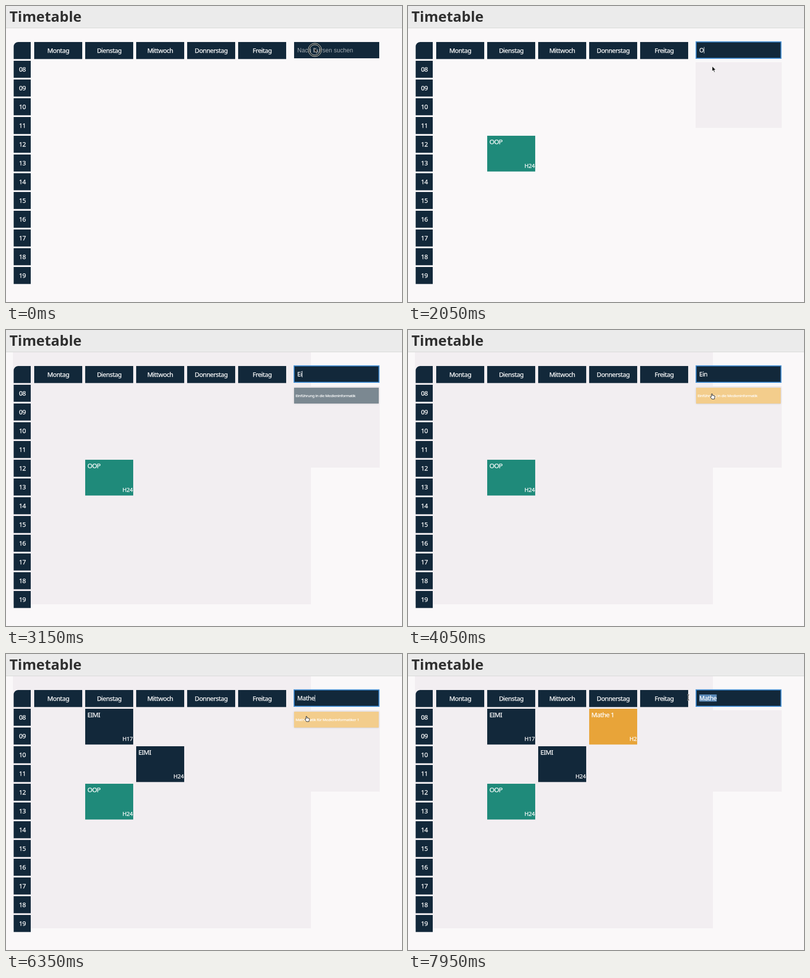
Recreate the animation shown at these times as an HTML page with a canvas. Size 800 by 600 pixels, loop 8 s.

```html
<!DOCTYPE html>
<html lang="de">
<head>
<meta charset="utf-8">
<title>Timetable</title>
<style>
  html, body { margin: 0; width: 100%; height: 100%; overflow: hidden; background: #faf8f9; }
  canvas { display: block; }
</style>
</head>
<body>
<canvas id="stage" width="800" height="600"></canvas>
<script>
const ctx = document.getElementById('stage').getContext('2d');
const LOOP = 8000;
const SANS = '"Noto Sans", sans-serif';
const NAVY = '#12283a', GREEN = '#1f8a7a', ORANGE = '#e8a439', TINT = '#f2eef1';
const DAYS = ['Montag', 'Dienstag', 'Mittwoch', 'Donnerstag', 'Freitag'];
const COURSES = [
  'Objektorientierte Programmierung mit Java',
  'Einführung in die Medieninformatik',
  'Mathematik für Medieninformatiker 1',
  'Multimedia Technology'
];
const CARDS = [
  { from: 1800, day: 1, hour: 12, name: 'OOP', room: 'H24', color: GREEN },
  { from: 4250, day: 1, hour: 8, name: 'EIMI', room: 'H17', color: NAVY },
  { from: 4250, day: 2, hour: 10, name: 'EIMI', room: 'H24', color: NAVY },
  { from: 6650, day: 3, hour: 8, name: 'Mathe 1', room: 'H2', color: ORANGE }
];
const TYPING = [
  [1050, 'O'], [2950, 'E'], [3150, 'Ei'], [3350, 'Ein'],
  [5150, 'M'], [5400, 'Ma'], [5550, 'Mat'], [5700, 'Math'], [5900, 'Mathe']
];
const LIST_OPEN = [[1050, 1800], [2950, 4250], [5150, 6650]];
const SELECTING = [[2600, 2950], [4750, 5150], [7250, LOOP]];
const CURSOR_HIDDEN = [[950, 1350], [2900, 3600], [5100, 6000]];
const CLICKS = [0, 1750, 2500, 4200, 4700, 6600, 7200];
// time, x, y of the pointer's resting points
const PATH = [
  [0, 624, 89], [1350, 624, 89], [1650, 622, 133], [1850, 622, 133],
  [2450, 592, 90], [2600, 592, 90], [2800, 576, 90], [3600, 576, 90],
  [4000, 615, 134], [4250, 615, 134], [4650, 612, 90], [4750, 612, 90],
  [4950, 576, 90], [6000, 576, 90], [6300, 608, 131], [6700, 608, 131],
  [7100, 630, 89], [7250, 630, 89], [7650, 592, 88], [7900, 566, 88], [LOOP, 566, 88]
];

const within = (t, spans) => spans.some(([a, b]) => t >= a && t < b);
const dayX = day => 57 + day * 103;
const hourY = hour => 111 + (hour - 8) * 38;

function rect(x, y, w, h, color) {
  ctx.fillStyle = color;
  ctx.fillRect(x, y, w, h);
}

function text(str, x, y, { size = 13, align = 'left', color = '#fff', spacing = -.6,
                           weight = 400, family = SANS, stroke = .25 } = {}) {
  ctx.font = `${weight} ${size}px ${family}`;
  ctx.letterSpacing = spacing + 'px';
  ctx.textAlign = align;
  ctx.fillStyle = ctx.strokeStyle = color;
  ctx.lineWidth = stroke;
  ctx.fillText(str, x, y);
  if (stroke) ctx.strokeText(str, x, y);
  return ctx.measureText(str).width;
}

function pointerAt(t) {
  const i = Math.max(1, PATH.findIndex(p => p[0] > t));
  const [t0, x0, y0] = PATH[i - 1], [t1, x1, y1] = PATH[i];
  const u = (t - t0) / (t1 - t0), e = u * u * (3 - 2 * u);
  return { x: x0 + (x1 - x0) * e, y: y0 + (y1 - y0) * e };
}

function drawTable() {
  rect(0, 0, 800, 44, '#ebebeb');
  rect(0, 44, 800, 1, '#d6d6d6');
  text('Timetable', 7, 32, { size: 29, weight: 700, color: '#303030', spacing: 0, stroke: 0 });
  ctx.fillStyle = NAVY;
  ctx.beginPath();
  ctx.roundRect(15.5, 73, 34.5, 34.5, [9, 0, 0, 0]);
  ctx.fill();
  DAYS.forEach((day, i) => {
    rect(dayX(i), 73, 97, 34.5, NAVY);
    text(day, dayX(i) + 48.5, 95, { align: 'center' });
  });
  for (let hour = 8; hour < 20; hour++) {
    rect(15.5, hourY(hour), 34.5, 34.5, NAVY);
    text(String(hour).padStart(2, '0'), 33, hourY(hour) + 22, { align: 'center' });
  }
}

function drawCard({ day, hour, name, room, color }) {
  const x = dayX(day), y = hourY(hour);
  rect(x, y, 97, 72.5, color);
  text(name, x + 4.5, y + 17);
  text(room, x + 96, y + 65, { size: 11.5, align: 'right', spacing: -.3 });
}

function drawSearch(t, query, lastKey, pointer) {
  const focused = t >= 50;
  rect(582, 73, 172, 33, NAVY);
  if (focused) {
    ctx.strokeStyle = '#3f8ad0';
    ctx.lineWidth = 2;
    ctx.strokeRect(582, 72.7, 171.5, 33.3);
  }
  let end = 588.5;
  if (!query) {
    text('Nach Kursen suchen', end, 93.5,
      { size: 12, family: '"Liberation Sans", sans-serif', color: '#a3abb1', spacing: .08, stroke: 0 });
  }
  const style = { size: 12, spacing: -.2 };
  if (query) end += text(query, 588.5, 93.5, style);
  if (within(t, SELECTING)) {
    const left = Math.max(588.5, Math.min(end, pointer.x));
    rect(left, 82, end - left, 14.5, '#5b8ab8');
    text(query, 588.5, 93.5, style);
  } else if (focused && (t - lastKey) % 1000 < 500) {
    rect(end, 83, 1, 13, '#dce2e6');
  }
}

function drawList(items, pointer, hovering) {
  ctx.save();
  ctx.shadowColor = 'rgba(0,0,0,.15)';
  ctx.shadowBlur = 4;
  rect(582, 117, 171, items.length * 32.1, '#7b8891');
  ctx.restore();
  items.forEach((name, i) => {
    const y = 117 + i * 32.1;
    if (hovering && pointer.y >= y && pointer.y < y + 32.1) rect(582, y, 171, 32.1, '#f3cd8c');
    text(name, 585, y + 18.7, { size: 7.8, spacing: -.29, stroke: .2 });
  });
}

function shape(x, y, path, fill, line, width = 1) {
  ctx.save();
  ctx.translate(x, y);
  const p = new Path2D(path);
  ctx.lineJoin = 'round';
  ctx.strokeStyle = line;
  ctx.lineWidth = width;
  if (fill) ctx.fillStyle = fill, ctx.fill(p);
  ctx.stroke(p);
  ctx.restore();
}

function drawPointer(t, { x, y }, hovering) {
  if (hovering) {
    shape(x, y, 'M-2 1V-4Q-1-6 0-4V-1Q1-2 2-1Q3-2 4 0Q5-1 5 1L4 6H-1L-4 2Q-4 0-2 1Z', '#fff', '#222');
  } else if (t < 100) {
    shape(x, y, 'M-1-4V5L1 3L3 7L4.5 6L3 3H6Z', '#111', '#ddd', .8);
  } else if (y < 108) {
    const beam = 'M-2-5.5Q0-5.5 0-4V4Q0 5.5 2 5.5M2-5.5Q0-5.5 0-4M0 4Q0 5.5-2 5.5';
    shape(x, y, beam, null, '#d8d8d8', 2);
    shape(x, y, beam, null, '#222', 1);
  } else {
    shape(x, y, 'M0 0V11L2.5 8.5L4.5 13L6 12L4.5 8H8Z', '#111', '#fff');
  }
}

function drawClick(t, { x, y }) {
  const start = CLICKS.find(c => t >= c && t < c + 200);
  if (start === undefined) return;
  const r = 13.5 - (t - start) * .056;
  const ring = (radius, color, width) => {
    ctx.beginPath();
    ctx.arc(x, y, radius, 0, 2 * Math.PI);
    ctx.strokeStyle = color;
    ctx.lineWidth = width;
    ctx.stroke();
  };
  ring(r - 1.5, '#18242d', 3);
  ring(r, '#e4dfcf', 1);
  ring(r - 3, '#e4dfcf', 1);
}

function draw(t) {
  const [lastKey, query] = TYPING.filter(k => k[0] <= t).pop() || [50, ''];
  const pointer = pointerAt(t);
  const visible = !within(t, CURSOR_HIDDEN);
  const items = within(t, LIST_OPEN)
    ? COURSES.filter(c => c.toLowerCase().includes(query.toLowerCase())) : [];
  const hovering = visible && pointer.y >= 117 && pointer.y < 117 + items.length * 32.1;

  rect(0, 0, 800, 600, '#faf8f9');
  if (t >= 1800) rect(581, 114, 174, t < 2950 ? 133 : 165, TINT);
  if (t >= 2950) rect(14, 45, 602, 511, TINT);
  drawTable();
  CARDS.filter(c => t >= c.from).forEach(drawCard);
  drawSearch(t, query, lastKey, pointer);
  if (items.length) drawList(items, pointer, hovering);
  if (visible) {
    drawClick(t, pointer);
    drawPointer(t, pointer, hovering);
  }
}

const began = performance.now();
function tick() {
  const t = (performance.now() - began) % LOOP;
  draw(Math.floor(t / 50) * 50);
  requestAnimationFrame(tick);
}
tick();
</script>
</body>
</html>
```
